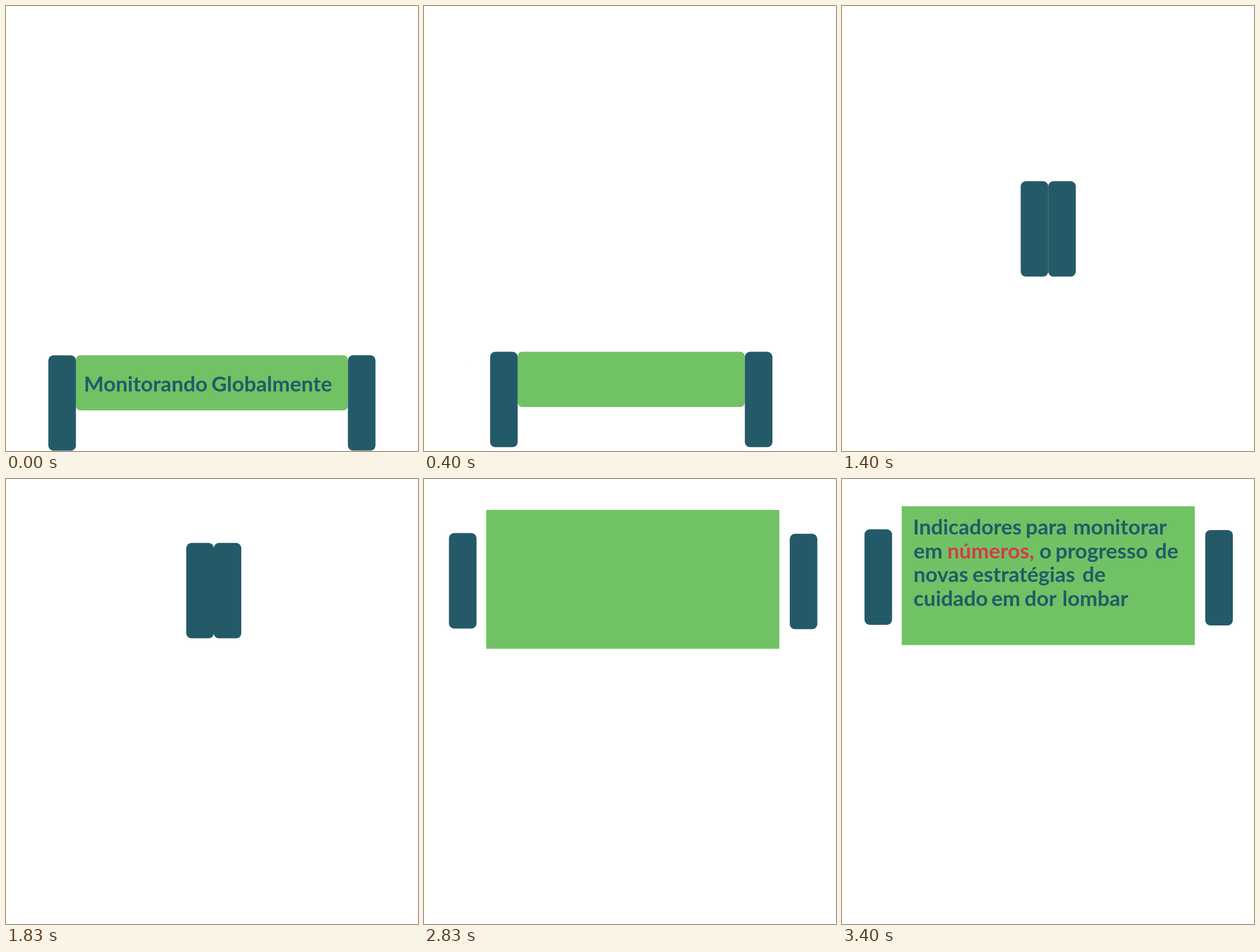
Recreate the animation shown at these times as an HTML page. Size 720 px wide and 778 px high, loop 3970 ms.

```html
<!DOCTYPE html>
<html lang="pt">
<head>
<meta charset="utf-8">
<title>Monitorando Globalmente</title>
<style>
  html, body { margin: 0; width: 100%; height: 100%; overflow: hidden; background: #fff; }
  svg { display: block; width: 100%; height: 100%; }
  text { font: 700 37px Lato, "Open Sans", sans-serif; fill: #245a68; }
  .bar { fill: #245a68; }
  .panel { fill: #70c264; }
  .accent { fill: #d63a4a; }
</style>
</head>
<body>
<svg id="stage" viewBox="0 0 720 778"></svg>
<script>
const LOOP = 3970;
const stage = document.getElementById('stage');

function add(tag, attrs, text = '') {
  const el = document.createElementNS('http://www.w3.org/2000/svg', tag);
  for (const key in attrs) el.setAttribute(key, attrs[key]);
  el.textContent = text;
  return stage.appendChild(el);
}

// The poses are held, with hard cuts between them.
// bars: left x, left y, right x, right y; panel: x, y, width, height, radius
const poses = [
  { at: 0, bars: [74, 610.7, 597.5, 610.5], panel: [122, 610.5, 475.5, 96.5, 8], words: 'title' },
  { at: 400, bars: [115.5, 604.5, 560.7, 604.5], panel: [163.5, 604.5, 397.2, 96.5, 8] },
  { at: 900, bars: [279, 609, 395.5, 609] },
  { at: 1400, bars: [312.3, 306.3, 360.4, 306.3] },
  { at: 1830, bars: [315, 111.8, 363, 111.8] },
  { at: 2330, bars: [222.6, 109.7, 451.6, 111.8] },
  { at: 2830, bars: [43.6, 94.6, 639.2, 95.8], panel: [108.7, 54, 512.2, 242.8, 0] },
  { at: 3400, bars: [39.3, 88.1, 634.8, 89.2], panel: [104.4, 47.6, 512.2, 242.8, 0], words: 'message' }
];

const panel = add('rect', { class: 'panel' });
const bars = [0, 1].map(() => add('rect', { class: 'bar', width: 48.2, height: 166.8, rx: 9 }));

function line(y, words, starts) {
  return words.split(' ').map((word, i) =>
    add('text', { x: starts[i], y, class: word === 'números,' ? 'accent' : '' }, word));
}

const texts = {
  title: line(674, 'Monitorando Globalmente', [136, 359]),
  message: [
    ...line(97, 'Indicadores para monitorar', [124, 321, 404]),
    ...line(138.5, 'em números, o progresso de', [125, 184, 345, 373, 547]),
    ...line(180, 'novas estratégias de', [125, 228, 420]),
    ...line(221.5, 'cuidado em dor lombar', [125, 261, 319, 385])
  ]
};

function set(el, names, values) {
  names.forEach((name, i) => el.setAttribute(name, values[i]));
}

function draw(time) {
  const pose = poses.findLast(p => p.at <= time);
  bars.forEach((bar, i) => set(bar, ['x', 'y'], pose.bars.slice(i * 2)));
  set(panel, ['x', 'y', 'width', 'height', 'rx'], pose.panel || [0, 0, 0, 0, 0]);
  for (const key in texts)
    for (const el of texts[key]) el.setAttribute('visibility', key === pose.words ? 'visible' : 'hidden');
}

function tick() {
  draw(performance.now() % LOOP);
  requestAnimationFrame(tick);
}
tick();
</script>
</body>
</html>
```
